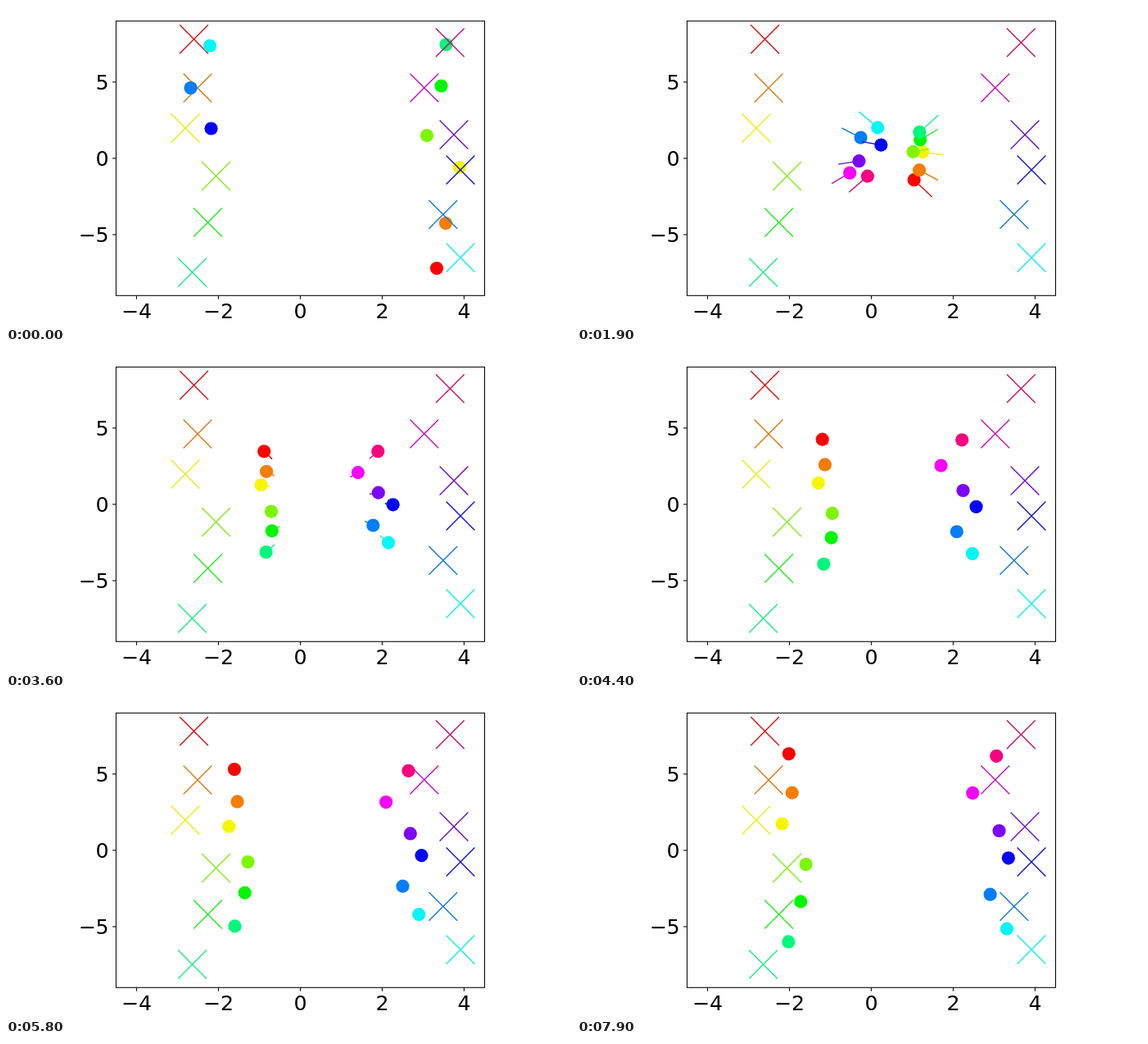
Recreate the animation shown at these times as an HTML page. Size 690 px wide and 388 px high, loop 8000 ms.

```html
<!DOCTYPE html>
<html lang="en">
<head>
<meta charset="utf-8">
<title>Agents swapping sides</title>
<style>
  html, body { margin: 0; width: 100%; height: 100%; overflow: hidden; background: #fff; }
  svg { display: block; width: 690px; height: 388px; }
  text { font: 25.2px "DejaVu Sans", sans-serif; }
  .axes { fill: none; stroke: #000; stroke-width: 1.05; }
  .line { fill: none; stroke-width: 1.4; }
</style>
</head>
<body>
<svg viewBox="0 0 690 388">
  <g id="agents"></g>
  <g id="axes"><rect class="axes" x="134.4" y="18.3" width="450.1" height="335"/></g>
</svg>
<script>
const LOOP = 8000, STEP = 100;
const TRAIL = 0.35, CRUISE = 3.3, DECAY = 0.25; // seconds, seconds, per second
const ARM = 17.4, FIRST_GROUP = 9;

// Each agent: start and goal. Hues run once around the wheel.
const agents = [
  [526, 320, 229.5, 40.5],
  [537, 265, 234, 100],
  [554, 197, 219, 149],
  [514, 158, 256.5, 207.5],
  [531.5, 97.5, 246.5, 264],
  [537.5, 47, 227.5, 325],
  [249, 48.5, 555, 307],
  [225.5, 100, 533.8, 254.3],
  [250.5, 149.5, 555, 200],
  [213, 210, 547, 157],
  [218, 271, 510.8, 99.8],
  [237, 310, 542.3, 44.7]
];

function add(parent, tag, attrs, text) {
  const el = document.createElementNS("http://www.w3.org/2000/svg", tag);
  for (const key in attrs) el.setAttribute(key, attrs[key]);
  if (text) el.textContent = text;
  return parent.appendChild(el);
}

// Share of the way covered: nearly steady speed, then an exponential approach.
function progress(t, distance) {
  const rest = 0.23 + distance / 5000;
  return t < CRUISE
    ? (1 - rest) * (t / CRUISE) ** 1.05
    : 1 - rest * Math.exp(-DECAY * (t - CRUISE));
}

const axes = document.getElementById("axes");
const label = n => String(n).replace("-", "\u2212");
for (const n of [-4, -2, 0, 2, 4]) {
  const x = 359.4 + n * 50;
  add(axes, "path", { class: "axes", d: `M${x} 353.3v4.4` });
  add(axes, "text", { x, y: 381.4, "text-anchor": "middle" }, label(n));
}
for (const n of [5, 0, -5]) {
  const y = 185.9 - n * 18.62;
  add(axes, "path", { class: "axes", d: `M134.4 ${y}h-4.4` });
  add(axes, "text", { x: 125.6, y: y + 9.3, "text-anchor": "end" }, label(n));
}

const layer = document.getElementById("agents");
const movers = agents.map(([sx, sy, gx, gy], i) => {
  const hue = i * 360 / agents.length;
  const light = 47 + 6 * Math.cos((hue - 120) * Math.PI / 180);
  const stroke = `hsl(${hue}, 84%, ${light}%)`;
  const w = 2 * ARM;
  const trail = add(layer, "path", { class: "line", stroke });
  const dot = add(layer, "circle", { r: 8.1, fill: `hsl(${hue}, 97%, 49%)` });
  add(layer, "path", {
    class: "line", stroke,
    d: `M${gx - ARM} ${gy - ARM}l${w} ${w}m${-w} 0l${w} ${-w}`
  });
  const distance = Math.hypot(gx - sx, gy - sy);
  const at = t => {
    const p = progress(t, distance);
    return [sx + (gx - sx) * p, sy + (gy - sy) * p];
  };
  return { trail, dot, at, late: i >= FIRST_GROUP };
});

function draw(now) {
  const t = Math.floor(now % LOOP / STEP) * STEP / 1000;
  for (const { trail, dot, at, late } of movers) {
    const [x, y] = at(t);
    dot.setAttribute("cx", x);
    dot.setAttribute("cy", y);
    // The last group joins one step after the start.
    dot.setAttribute("visibility", late && t === 0 ? "hidden" : "visible");
    trail.setAttribute("d", `M${at(Math.max(0, t - TRAIL))}L${x},${y}`);
  }
}

const start = performance.now();
function tick() {
  draw(performance.now() - start);
  requestAnimationFrame(tick);
}
tick();
</script>
</body>
</html>
```
